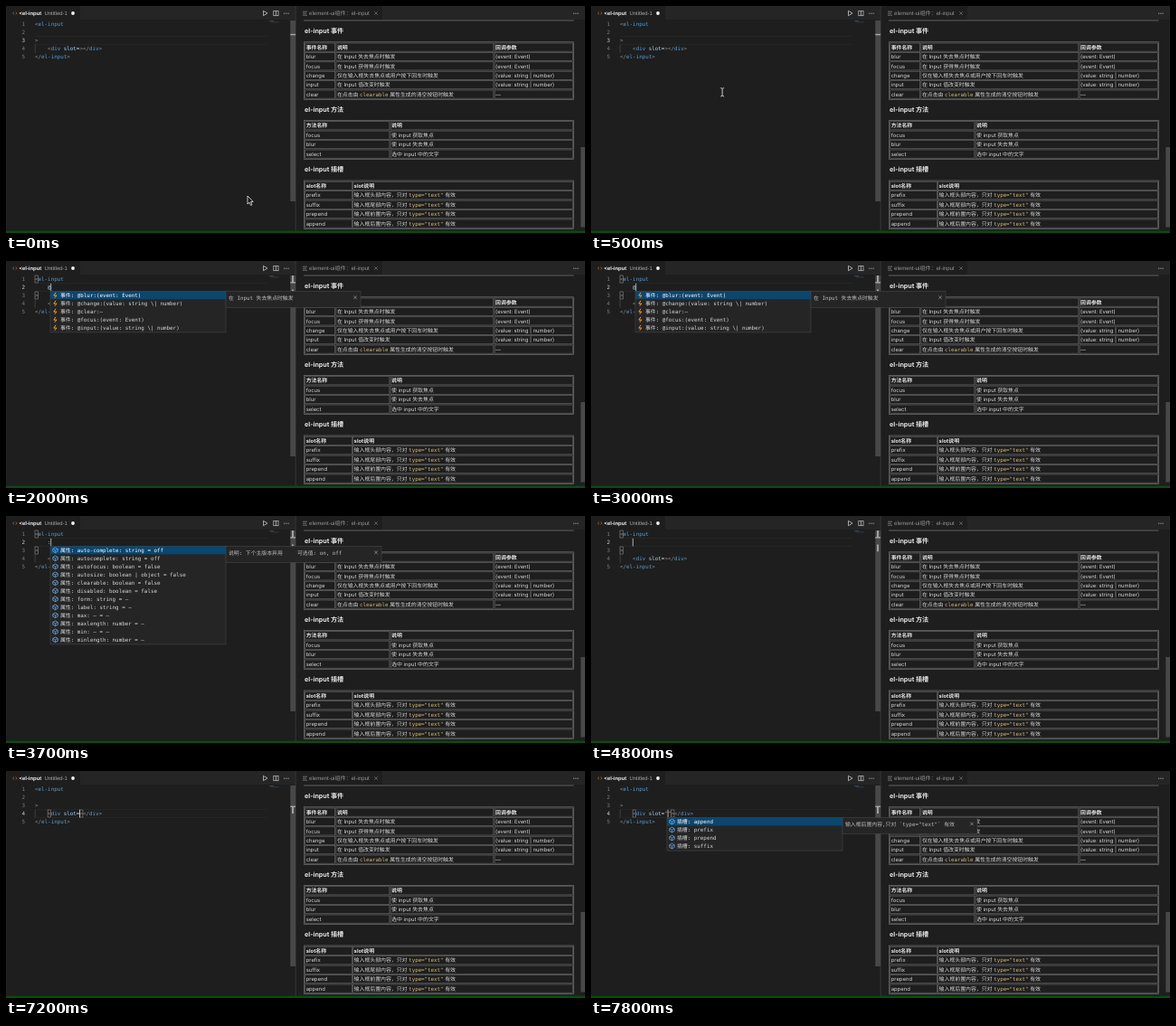
Recreate the animation shown at these times as an HTML page with a canvas. Size 640 by 251 pixels, loop 8000 ms.

```html
<!DOCTYPE html>
<html lang="zh">
<head>
<meta charset="utf-8">
<style>
html, body { margin: 0; width: 100%; height: 100%; overflow: hidden; background: #1e1e1e; }
canvas { display: block; width: 640px; height: 251px; }
</style>
</head>
<body>
<canvas id="stage"></canvas>
<script>
const LOOP = 8000, W = 640, H = 251;
const CH = 3.53, CODE_X = 32, LINE_Y = 20, LINE_H = 9;
const SANS = '"Inter", "Noto Sans CJK SC", "Noto Sans CJK", sans-serif';
const TAB = '"Liberation Sans", "Noto Sans CJK SC", "Noto Sans CJK", sans-serif';
const MONO = '"DejaVu Sans Mono", "Noto Sans CJK SC", "Noto Sans CJK", monospace';
const CODE = '5.86px ' + MONO;
const C = { bg: '#1e1e1e', bar: '#252526', tag: '#569cd6', attr: '#9cdcfe', punct: '#8d8d8d',
            str: '#ce9178', text: '#d8d8d8', edge: '#454545', grid: '#707070', thumb: '#484848' };

const canvas = document.getElementById('stage');
const g = canvas.getContext('2d');
const dpr = window.devicePixelRatio || 1;
canvas.width = W * dpr;
canvas.height = H * dpr;
g.textRendering = 'geometricPrecision';

function box(x, y, w, h, color) {
  g.fillStyle = color;
  g.fillRect(x, y, w, h);
}

function frame(x, y, w, h, color, width = 0.7) {
  g.strokeStyle = color;
  g.lineWidth = width;
  g.strokeRect(x, y, w, h);
}

function path(points, color, width = 0.8, close = false) {
  g.beginPath();
  points.forEach(([x, y]) => g.lineTo(x, y));
  if (close) g.closePath();
  g.strokeStyle = color;
  g.lineWidth = width;
  g.stroke();
}

// y is the visual middle of the line; returns the right end
function write(str, x, y, color, font = CODE) {
  g.font = font;
  g.fillStyle = color;
  g.fillText(str, x, y + 2.1);
  return x + g.measureText(str).width;
}

function cross(x, y, color = '#b5b5b5', r = 1.8) {
  path([[x - r, y - r], [x + r, y + r]], color, 0.6);
  path([[x - r, y + r], [x + r, y - r]], color, 0.6);
}

function dots(x, y) {
  for (let i = 0; i < 3; i++) box(x + i * 2.2, y, 1, 1, '#c5c5c5');
}

const lineY = n => LINE_Y + (n - 1) * LINE_H;

// ---- preview pane ----
function cell(str, x, y, bold) {
  // backticks mark inline code
  str.split('`').forEach((part, i) => {
    x = i % 2 ? write(part, x, y, '#d7ba7d', '5.8px ' + MONO)
              : write(part, x, y, bold ? '#e8e8e8' : C.text, (bold ? 'bold ' : '') + '5.9px ' + SANS);
  });
}

function table(top, bottom, cols, rows) {
  const left = cols[0], right = cols[cols.length - 1];
  frame(left, top, right - left, bottom - top, C.grid);
  const pitch = (bottom - top - 1.2) / rows.length;
  rows.forEach((row, r) => {
    const y = top + 1.2 + r * pitch;
    row.forEach((str, c) => {
      const x = cols[c] + (c ? 0.6 : 1.2);
      const end = cols[c + 1] - (c + 2 === cols.length ? 1.2 : 0.6);
      frame(x, y, end - x, pitch - 1.2, C.grid, 0.6);
      cell(str, x + 1, y + pitch / 2 - 0.6, r === 0);
    });
  });
}

const slotNote = part => '输入框' + part + '内容，只对 `type="text"` 有效';

function preview() {
  const head = '#e6e6e6', font = 'bold 7.1px ' + SANS;
  box(329, 15.6, 298.5, 0.8, C.grid);
  write('el-input 事件', 330, 27.8, head, font);
  table(39.8, 103.4, [329.5, 364.3, 539.5, 627.5], [
    ['事件名称', '说明', '回调参数'],
    ['blur', '在 Input 失去焦点时触发', '(event: Event)'],
    ['focus', '在 Input 获得焦点时触发', '(event: Event)'],
    ['change', '仅在输入框失去焦点或用户按下回车时触发', '(value: string | number)'],
    ['input', '在 Input 值改变时触发', '(value: string | number)'],
    ['clear', '在点击由 `clearable` 属性生成的清空按钮时触发', '—']]);
  write('el-input 方法', 330, 115, head, font);
  table(126.5, 169.4, [329.5, 424.5, 627.5], [
    ['方法名称', '说明'],
    ['focus', '使 input 获取焦点'],
    ['blur', '使 input 失去焦点'],
    ['select', '选中 input 中的文字']]);
  write('el-input 插槽', 330, 181, head, font);
  table(193, 246.4, [329.5, 383, 627.5], [
    ['slot名称', 'slot说明'],
    ['prefix', slotNote('头部')],
    ['suffix', slotNote('尾部')],
    ['prepend', slotNote('前置')],
    ['append', slotNote('后置')]]);
  box(635.3, 156, 4.7, 88.5, C.thumb);
}

// ---- window chrome ----
function chrome() {
  box(0, 0, W, H, C.bg);
  box(82, 0, 238, 15, C.bar);
  box(416, 0, 224, 15, C.bar);
  box(319.7, 0, 0.8, 249, '#3c3c3c');

  path([[9, 6.6], [7.5, 8], [9, 9.4]], '#c9692c', 0.7);
  path([[10.6, 6.6], [12.1, 8], [10.6, 9.4]], '#c9692c', 0.7);
  write('<el-input', 14.5, 8, '#f0f0f0', 'bold 5.9px ' + TAB);
  write('Untitled-1', 42.5, 8, '#a8a8a8', '5.9px ' + TAB);
  g.fillStyle = '#f0f0f0';
  g.beginPath();
  g.arc(74, 8, 1.9, 0, 7);
  g.fill();

  path([[284.5, 5.3], [289, 8], [284.5, 10.7]], '#c5c5c5', 0.8, true);
  frame(295.8, 5.5, 5.2, 5.2, '#c5c5c5');
  path([[298.4, 5.5], [298.4, 10.7]], '#c5c5c5');
  dots(307.2, 7.7);

  for (let i = 0; i < 3; i++) box(328, 5.8 + i * 2, i === 1 ? 4 : 5, 0.7, '#8c8c8c');
  write('element-ui组件：el-input', 335, 8, '#949494', '6.1px ' + TAB);
  cross(409, 8, '#858585');
  dots(627.2, 7.7);
}

// ---- editor ----
function code(parts, line, col = 0) {
  let x = CODE_X + col * CH;
  parts.forEach(([str, color]) => { x = write(str, x, lineY(line), color); });
}

function mark(line, col) {
  frame(CODE_X + col * CH, lineY(line) - 4, CH, 8, '#888', 0.6);
}

function scrollbar(s) {
  const scale = 0.86, rulerY = n => 16 + (n - 1) * LINE_H * scale;
  box(314.3, 16, 5.7, 200, C.thumb);
  s.marks.forEach(([line]) => box(316, rulerY(line), 2, LINE_H * scale, '#a0a0a0'));
  box(314.3, rulerY(s.line) - 0.6, 5.7, 1.4, '#a8a8a8');
  // minimap
  box(291, 16, 5, 0.8, '#33506a');
  box(292.5, 17.6, 9, 0.6, '#33506a');
}

function editor(s) {
  for (const edge of [-4.5, 4.5]) box(32, lineY(s.line) + edge - 0.3, 256, 0.6, '#2b2b2b');
  box(CODE_X - 0.2, lineY(4) - 4.5, 0.6, LINE_H, '#505050');
  scrollbar(s);
  for (let n = 1; n <= 5; n++)
    write(String(n), 17.5, lineY(n), n === s.line ? '#d0d0d0' : '#7c7c7c');
  code([['<', C.punct], ['el-input', C.tag]], 1);
  code([[s.typed, C.attr]], 2, 4);
  code([['>', C.punct]], 3);
  code([['<', C.punct], ['div', C.tag], [' slot', C.attr], ['=', C.text],
        [s.quotes, C.str], ['></', C.punct], ['div', C.tag], ['>', C.punct]], 4, 4);
  code([['</', C.punct], ['el-input', C.tag], ['>', C.punct]], 5);
  s.marks.forEach(([line, col]) => mark(line, col));
  if (s.caret) box(CODE_X + s.col * CH - 0.3, lineY(s.line) - 4.2, 0.8, 8.6, '#d0d0d0');
}

// ---- suggestions ----
function boltIcon(x, y) {
  path([[x + 0.5, y - 3], [x - 1.7, y + 0.4], [x + 1.5, y + 0.2], [x - 0.7, y + 3]], '#ee9d28', 1);
}

function cubeIcon(x, y) {
  path([[x, y - 2.8], [x + 2.7, y - 1.3], [x + 2.7, y + 1.4], [x, y + 2.8],
        [x - 2.7, y + 1.4], [x - 2.7, y - 1.3]], '#75beff', 0.7, true);
  path([[x - 2.7, y - 1.3], [x, y + 0.1], [x + 2.7, y - 1.3]], '#75beff', 0.6);
  path([[x, y + 0.1], [x, y + 2.8]], '#75beff', 0.6);
}

function popup(list, showNote) {
  const { x, y, kind, icon, items, note, noteEnd } = list;
  const w = 194, h = items.length * LINE_H;
  box(x, y, w, h + 0.6, C.bar);
  box(x, y, w, LINE_H, '#094771');
  items.forEach((item, i) => {
    const mid = y + (i + 0.5) * LINE_H;
    icon(x + 5.5, mid);
    write(kind + ': ' + item, x + 11, mid, i ? C.text : '#fff');
  });
  frame(x, y, w, h + 0.6, C.edge, 0.6);
  if (!showNote) return;
  const left = x + w;
  box(left, y, noteEnd - left, 18, C.bar);
  frame(left, y, noteEnd - left, 18, C.edge, 0.6);
  note.forEach(([str, dx]) => write(str, left + dx, y + 7.3, '#bdbdbd'));
  cross(noteEnd - 6, y + 7);
}

const events = {
  x: 49, y: 33.3, kind: '事件', icon: boltIcon, noteEnd: 392,
  items: ['@blur:(event: Event)', '@change:(value: string \\| number)', '@clear:—',
          '@focus:(event: Event)', '@input:(value: string \\| number)'],
  note: [['在 Input 失去焦点时触发', 3]]
};
const props = {
  x: 49, y: 33.3, kind: '属性', icon: cubeIcon, noteEnd: 415,
  items: ['auto-complete: string = off', 'autocomplete: string = off', 'autofocus: boolean = false',
          'autosize: boolean | object = false', 'clearable: boolean = false',
          'disabled: boolean = false', 'form: string = —', 'label: string = —', 'max: — = —',
          'maxlength: number = —', 'min: — = —', 'minlength: number = —'],
  note: [['说明: 下个主版本弃用', 3], ['可选值: on, off', 79]]
};
const slots = {
  x: 84, y: 51.5, kind: '插槽', icon: cubeIcon, noteEnd: 427,
  items: ['append', 'prefix', 'prepend', 'suffix'],
  note: [['输入框后置内容,只对 `type="text"` 有效', 3]]
};

// ---- pointer ----
function pointer(t) {
  if (t >= 1400) return;
  const p = Math.min(1, Math.max(0, (t - 50) / 750));
  const e = p * p * (3 - 2 * p);
  const x = 267 + (79.5 - 267) * e, y = 210 + (33.5 - 210) * e;
  if (p === 0) {
    g.beginPath();
    [[0, 0], [0, 9], [2, 7.2], [3.6, 10.4], [5, 9.7], [3.5, 6.6], [6.2, 6.4]]
      .forEach(([dx, dy]) => g.lineTo(x + dx, y + dy));
    g.closePath();
    g.fillStyle = '#111';
    g.fill();
    g.strokeStyle = '#eee';
    g.lineWidth = 0.8;
    g.stroke();
    return;
  }
  path([[x, y - 4], [x, y + 4]], '#ddd', 0.9);
  for (const side of [-1, 1])
    path([[x - 2, y + side * 4.7], [x, y + side * 4], [x + 2, y + side * 4.7]], '#ddd', 0.8);
}

// ---- timeline ----
// times that restart the caret blink
const KEYS = [0, 1000, 1400, 1900, 3100, 3700, 5000, 6000, 6800, 7200, 7600];

function caretCol(t) {
  if (t < 1000) return 1;
  if (t < 1400) return 0;
  if (t < 5300) return 4 + (typedAt(t) ? 1 : 0);
  if (t < 6000) return 14;
  if (t < 6300) return 21;
  if (t < 7100) return Math.max(15, 20 - Math.floor((t - 6300) / 100));
  return t < 7600 ? 14 : 15;
}

function typedAt(t) {
  if (t >= 1900 && t < 3100) return '@';
  if (t >= 3600 && t < 4800) return ':';
  return '';
}

function marksAt(t, col) {
  if (t < 1000) return [];
  if (t < 5300) return [[1, 0], [3, 0]];
  if (t >= 7600) return [[4, 4], [4, 16]];
  if (col === 14) return [[4, 4], [4, 14]];
  return [15, 16, 20, 21].includes(col) ? [[4, 15], [4, 20]] : [];
}

function stateAt(t) {
  const key = KEYS.filter(k => k <= t).pop();
  const stepping = t >= 6300 && t < 6800;
  const col = caretCol(t);
  return {
    line: t < 1000 ? 3 : t < 5300 ? 2 : 4,
    col,
    caret: t >= 1000 && (stepping || Math.floor((t - key) / 500) % 2 === 0),
    typed: typedAt(t),
    quotes: t >= 7600 ? '""' : '',
    marks: marksAt(t, col)
  };
}

function draw(t) {
  g.setTransform(dpr, 0, 0, dpr, 0, 0);
  chrome();
  preview();
  editor(stateAt(t));
  if (t >= 1900 && t < 3100) popup(events, t >= 2000);
  if (t >= 3600 && t < 4800) popup(props, t >= 3700);
  if (t >= 7650) popup(slots, t >= 7700);
  pointer(t);
  box(0, 248.7, W, 2.3, '#0a4d10');
}

const start = performance.now();
function tick() {
  draw((performance.now() - start) % LOOP);
  requestAnimationFrame(tick);
}
tick();
</script>
</body>
</html>
```
